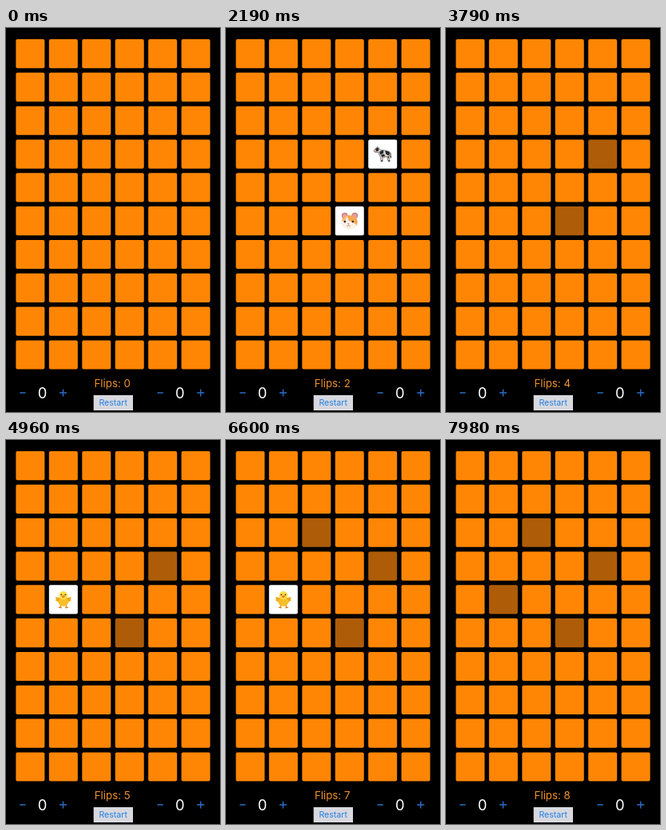
An HTML page for the animation above (8 s loop, 268 px wide and 480 px high).

```html
<!DOCTYPE html>
<html lang="en">
<head>
<meta charset="utf-8">
<title>Memory cards</title>
<style>
  html, body { margin: 0; width: 100%; height: 100%; overflow: hidden; background: #000; }
  svg { display: block; width: 268px; height: 480px; font-family: Inter, Roboto, sans-serif; }
  text { text-anchor: middle; }
  .back { fill: #ff8604; }
  .seen { fill: #ae5c08; }
  .face { fill: #fff; }
  .score { font-size: 18.5px; fill: #fff; }
  .sign { stroke: #2a6fc8; stroke-width: 1.4; fill: none; }
</style>
</head>
<body>
<svg id="stage" viewBox="0 0 268 480">
  <defs>
    <g id="cow">
      <path d="M-9-7 L-7-9 L-5-8 L-3-5 Q3-5 8-3 Q11-2 10.500 4 L9.500 4 L9-1 L8 3 L9 9 H7 L5 3 L0 3 L0 9 H-2 L-3 3 Q-5 1-5-2 L-8-2 Q-11-2-11-4 Z" fill="#dad8d3" stroke="#5e5a54" stroke-width=".7"/>
      <path d="M-9-6 L-7-8 L-5-7 L-5-4 L-8-3 Z M-4-3 L1-5 L1-1 L-3 1 Z M3-4 Q8-4 9-1 L7 2 L4 0 Z M-2 1 L2 0 L3 3 L-1 4 Z M6 3 L8 3 L7 6 Z" fill="#25262b"/>
      <path d="M-11-4 L-8-4 L-8-2 H-10 Z M0 3 H4 L3 5 H1 Z" fill="#c99683"/>
      <path d="M-2 8 H0 V9.500 H-2.500 Z M7 8 H9 V9.500 H7 Z M9.500 3 L11 3 L10.500 6 Z" fill="#3b3733"/>
    </g>
    <g id="mouse">
      <circle cx="-6" cy="-6.500" r="3.900" fill="#c88778"/>
      <circle cx="6.500" cy="-6.500" r="3.900" fill="#c88778"/>
      <circle cx="-6" cy="-6" r="2.600" fill="#ed9cac"/>
      <circle cx="6.500" cy="-6" r="2.600" fill="#ed9cac"/>
      <ellipse cy="1.500" rx="10" ry="8.500" fill="#f5a750"/>
      <path d="M-3-6 L-1 0 Q3 0 6 3 Q9 4 8 7 Q5 10 0 10 C-6 10-10 7-10 2 Q-8-3-3-6" fill="#fff1e4"/>
      <path d="M-3-6 Q-8-4-9 0 L-5 0 Z" fill="#f4bd76"/>
      <circle cx="-6" cy="1" r="1.300" fill="#33272a"/>
      <circle cx="4" cy="1" r="1.300" fill="#33272a"/>
      <path d="M-3 3 H0 L-1.500 4.500 Z" fill="#e77d8a"/>
      <path d="M-4 6.500 Q-1.500 7-1.500 4.500 Q-1.500 7 1 6.500" fill="none" stroke="#a57263" stroke-width=".6"/>
    </g>
    <g id="chick">
      <path d="M-3 7 L-4 10 H-6 M-4 10 L-2 10.500 M3 7 L4 10 H6 M4 10 L2 10.500" fill="none" stroke="#dc8218" stroke-width="1.300"/>
      <path d="M-4-2 L-10-3 L-9 0 L-10 1 L-7 3 L-5 4 Z M4-2 L10-3 L9 0 L10 1 L7 3 L5 4 Z" fill="#eea91c"/>
      <ellipse cy="3" rx="6.500" ry="5.500" fill="#f6bf28"/>
      <circle cy="-5" r="5.300" fill="#ffdd45"/>
      <path d="M-2.500-4 L0-5 L2.500-4 L0-1.500 Z" fill="#eb7c20"/>
      <circle cx="-2.500" cy="-6" r=".9" fill="#38281b"/>
      <circle cx="2.500" cy="-6" r=".9" fill="#38281b"/>
    </g>
  </defs>
  <g id="board"></g>
  <text id="flips" x="133.2" y="449" font-size="13.3" fill="#f0922c"></text>
  <rect x="109.7" y="459" width="49.3" height="19" fill="#d8d8df"/>
  <text x="134.2" y="472.3" font-size="10.6" fill="#2380e4">Restart</text>
  <g id="counters"></g>
</svg>
<script>
const DURATION = 8000;
const COLUMNS = 6, ROWS = 10;
const board = document.getElementById('board');
const flips = document.getElementById('flips');

// time of each tap, column, row, animal
const taps = [
  [1670, 4, 3, 'cow'],
  [2080, 3, 5, 'mouse'],
  [2700, 4, 3, 'cow'],
  [3300, 3, 5, 'mouse'],
  [4210, 1, 4, 'chick'],
  [5100, 2, 2, 'cow'],
  [5940, 2, 2, 'cow'],
  [7180, 1, 4, 'chick']
];

function add(parent, tag, attributes) {
  const node = document.createElementNS('http://www.w3.org/2000/svg', tag);
  for (const [key, value] of Object.entries(attributes)) node.setAttribute(key, value);
  return parent.appendChild(node);
}

const cards = Array.from({ length: COLUMNS * ROWS }, (_, i) => {
  const x = 12.4 + (i % COLUMNS) * 41.45;
  const y = 14 + Math.floor(i / COLUMNS) * 41.82;
  const rect = add(board, 'rect', { x, y, width: 36, height: 36.2, rx: 2, class: 'back' });
  return { rect, x: x + 18, y: y + 18 };
});

for (const [, column, row, animal] of taps) {
  const card = cards[row * COLUMNS + column];
  card.icon ??= add(board, 'use', {
    href: '#' + animal,
    transform: `translate(${card.x} ${card.y})`
  });
}

const counters = document.getElementById('counters');
for (const x of [45.5, 217.8]) {
  add(counters, 'text', { x, y: 462.5, class: 'score' }).textContent = '0';
  add(counters, 'path', {
    d: `M${x - 28.2} 456h7.2M${x + 21.5} 456h9m-4.5-4.5v9`,
    class: 'sign'
  });
}

function render(time) {
  const done = taps.filter(([start]) => start <= time);
  const turns = new Map();
  for (const [, column, row] of done) {
    const index = row * COLUMNS + column;
    turns.set(index, (turns.get(index) || 0) + 1);
  }
  cards.forEach(({ rect, icon }, index) => {
    const count = turns.get(index) || 0;
    const faceUp = count % 2 === 1;
    rect.setAttribute('class', faceUp ? 'face' : count ? 'seen' : 'back');
    icon?.setAttribute('visibility', faceUp ? 'visible' : 'hidden');
  });
  flips.textContent = `Flips: ${done.length}`;
}

const started = performance.now();
function tick() {
  render((performance.now() - started) % DURATION);
  requestAnimationFrame(tick);
}
tick();
</script>
</body>
</html>
```
